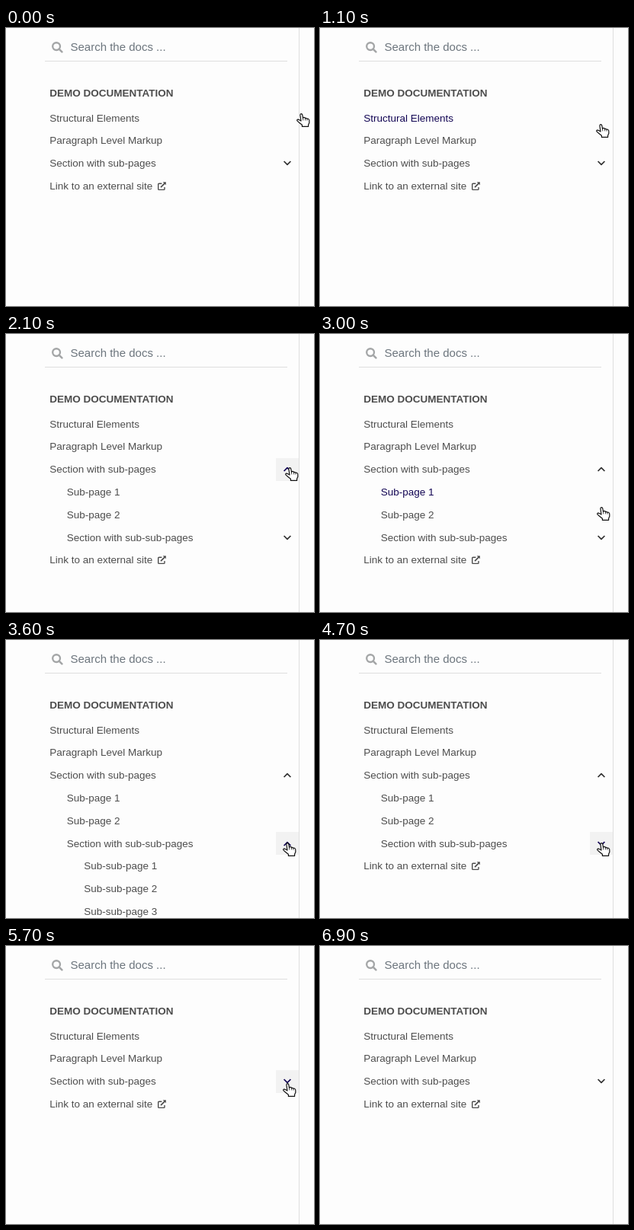
An HTML page that plays this animation: 404x365 px, repeating every 7200 ms.

```html
<!DOCTYPE html>
<html lang="en">
<head>
<meta charset="utf-8">
<title>Sidebar navigation</title>
<style>
  html, body { margin: 0; width: 100%; height: 100%; overflow: hidden; background: #fdfdfd; }
  svg { display: block; font: 13.5px "Liberation Sans", Arial, sans-serif; fill: #4d4d4d; }
  .line { fill: none; stroke: #4d4d4d; }
  .chevron { fill: none; stroke: #333; stroke-width: 1.76; stroke-linejoin: round; }
  .row.hover { fill: #130654; }
  .chevron.hover { stroke: #130654; }
</style>
</head>
<body>
<svg width="404" height="365" viewBox="0 0 404 365">
  <g transform="translate(60 18)" fill="none" stroke="#a4a6a7">
    <circle cx="6.1" cy="6.1" r="4.9" stroke-width="2.35"/>
    <path d="M9.6 9.6L13.4 13.4" stroke-width="2.6" stroke-linecap="round"/>
  </g>
  <text x="84.5" y="30" font-size="15" fill="#6c757d">Search the docs ...</text>
  <rect x="51" y="43" width="318" height="1" fill="#dedede"/>
  <rect x="384" width="1" height="365" fill="#dfdfdf"/>
  <text x="57.2" y="90" font-weight="bold">DEMO DOCUMENTATION</text>
  <rect id="pad" x="354" width="30" height="30" fill="#f2f2f2"/>
  <g id="menu"></g>
  <g id="external">
    <path class="line" stroke-width="1.4" d="M5.4 2.2H1.7Q.7 2.2 .7 3.2V9.4Q.7 10.4 1.7 10.4H8Q9 10.4 9 9.4V6.9"/>
    <path class="line" stroke-width="1.7" d="M4 7.1L9.3 1.8"/>
    <path d="M6.7 .2H10.8V4.3Z"/>
  </g>
  <g id="hand" stroke="#111" stroke-width="1.2" stroke-linejoin="round">
    <path fill="#fff" d="M6 10L4.9 2.4Q4.8 .8 6.2 .7Q7.5 .7 7.8 2.2L8.5 6.3Q9.2 5 10.3 5.4Q11.2 5.7 11.5 6.6Q12.7 5.9 13.9 7.2Q15.2 6.7 16 7.6Q17 8.4 16.8 10V12.6L15.6 15V17.3H7.4V15.2L3.6 12.2L1 9.9Q.3 8.7 1.5 8.1Q2.7 7.8 4 8.8Z"/>
    <path fill="none" stroke-width=".8" d="M8.5 6.3L8.8 9.4M11.5 6.6L11.7 9.4M13.9 7.2L14.1 9.6"/>
  </g>
  <path id="arrow" fill="#111" stroke="#fff" stroke-width=".8" d="M.3 .4V16L3.9 12.7L6.5 18.6L9 17.5L6.4 11.8H11.6Z"/>
  <path id="beam" class="line" style="stroke:#111" d="M0 .5H3Q4.5 .5 4.5 2V15Q4.5 16.5 3 16.5H0M9 .5H6Q4.5 .5 4.5 2V15Q4.5 16.5 6 16.5H9"/>
</svg>
<script>
const $ = id => document.getElementById(id);
const PITCH = 29.775, TOP = 103.3, TICK = 100, LOOP = 72;
const middle = row => Math.floor(118.2 + PITCH * row);

// depth is both the indent and the open level that reveals the item
const items = [
  ["Structural Elements", 0], ["Paragraph Level Markup", 0],
  ["Section with sub-pages", 0, true],
  ["Sub-page 1", 1], ["Sub-page 2", 1],
  ["Section with sub-sub-pages", 1, true],
  ["Sub-sub-page 1", 2], ["Sub-sub-page 2", 2], ["Sub-sub-page 3", 2],
  ["Link to an external site", 0]
];

// [tick, pointer, left, top]
const path = [
  [0, "hand", 381, 112], [1, "hand", 381, 115],
  [2, "arrow", 362, 85], [5, "arrow", 362, 85], [6, "arrow", 364, 93], [10, "arrow", 364, 93],
  [11, "hand", 362, 126], [15, "hand", 366, 175], [24, "hand", 366, 175],
  [25, "hand", 364, 175], [26, "hand", 364, 175], [33, "hand", 363, 266], [48, "hand", 363, 266],
  [49, "hand", 365, 250], [50, "hand", 365, 228], [51, "hand", 365, 228],
  [55, "hand", 363, 180], [65, "hand", 363, 180],
  [66, "arrow", 262, 98], [67, "beam", 185, 54], [68, "beam", 185, 54], [69, "", 0, 0]
];

function add(tag, attributes) {
  const node = document.createElementNS("http://www.w3.org/2000/svg", tag);
  for (const key in attributes) node.setAttribute(key, attributes[key]);
  return $("menu").appendChild(node);
}

const rows = items.map(([label, depth, toggles]) => {
  const text = add("text", { class: "row", x: 57.2 + 22.5 * depth });
  text.textContent = label;
  return { depth, text, chevron: toggles && add("path", { class: "chevron", d: "M-4.4-2.5L0 1.9L4.4-2.5" }) };
});

const show = (node, visible) => node.style.display = visible ? "" : "none";
const place = (node, x, y, extra = "") => node.setAttribute("transform", `translate(${x} ${y})${extra}`);

function pointerAt(tick) {
  const i = path.findLastIndex(key => key[0] <= tick);
  const [start, kind, x, y] = path[i];
  const [end, , nextX, nextY] = path[i + 1] || [LOOP, "", x, y];
  const part = (tick - start) / (end - start);
  return { kind, x: Math.round(x + (nextX - x) * part), y: Math.round(y + (nextY - y) * part) };
}

function draw(tick) {
  const level = (tick >= 21 && tick < 57) + (tick >= 36 && tick < 47);
  const { kind, x, y } = pointerAt(tick);
  // the highlight trails the pointer a little
  const hovered = kind === "hand" && x < 380 ? Math.floor((y - 7 - TOP) / PITCH) : -1;

  let line = 0;
  rows.forEach(({ depth, text, chevron }, i) => {
    const visible = depth <= level;
    show(text, visible);
    if (chevron) show(chevron, visible);
    if (!visible) return;
    const on = line === hovered;
    text.setAttribute("y", middle(line) + 5);
    text.classList.toggle("hover", on && !chevron);
    if (chevron) {
      place(chevron, 369, middle(line) + .5, level > depth ? " scale(1 -1)" : "");
      chevron.classList.toggle("hover", on);
    }
    if (i === rows.length - 1) place($("external"), 199, middle(line) - 5);
    line++;
  });

  show($("pad"), hovered === 2 || hovered === 5);
  $("pad").setAttribute("y", Math.round(TOP + PITCH * hovered));
  for (const id of ["hand", "arrow", "beam"]) {
    show($(id), id === kind);
    place($(id), x, y);
  }
}

let begin, shown;
function frame(now) {
  begin ??= now;
  const tick = Math.floor((now - begin) / TICK) % LOOP;
  if (tick !== shown) draw(shown = tick);
  requestAnimationFrame(frame);
}
draw(0);
requestAnimationFrame(frame);
</script>
</body>
</html>
```
